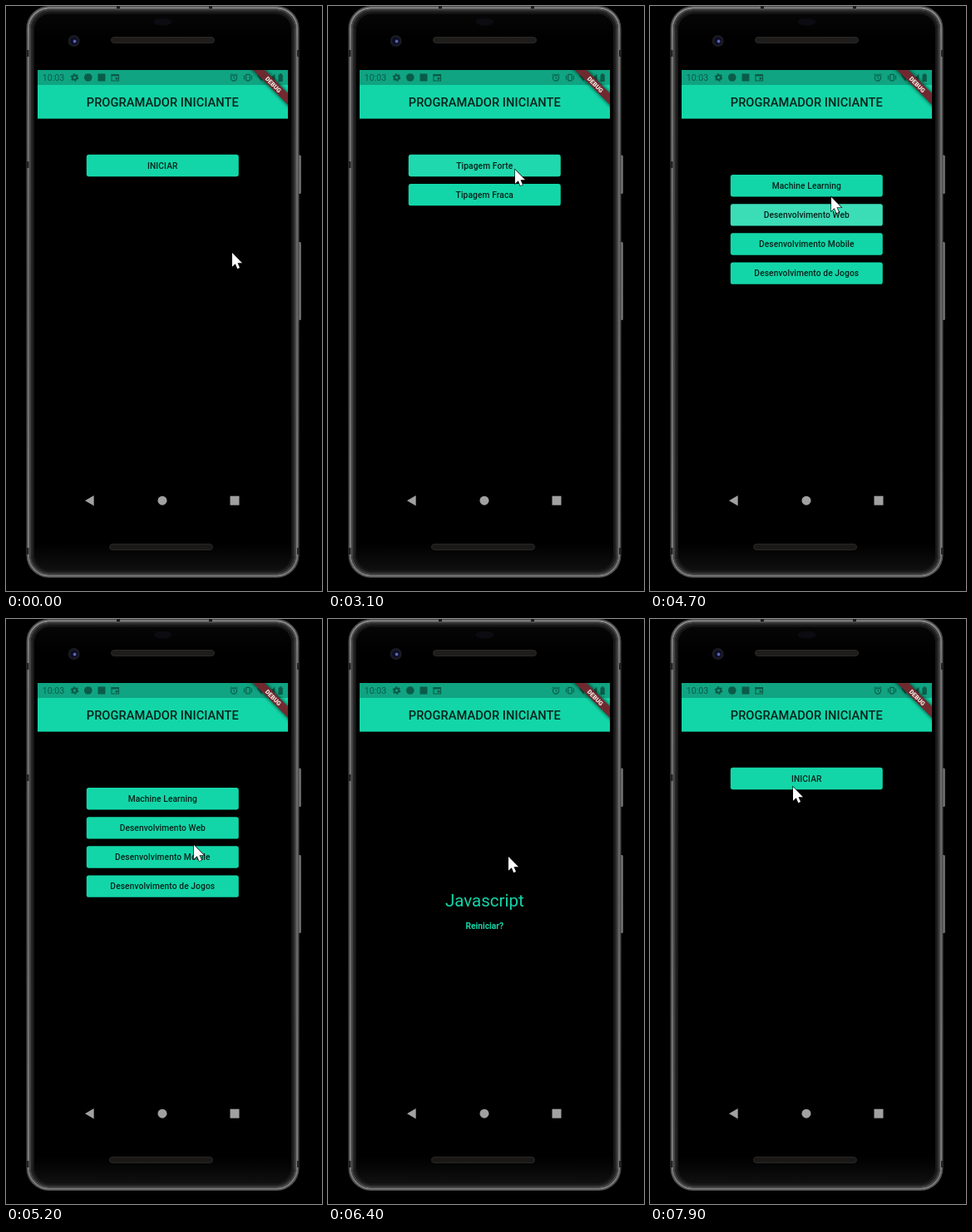
Recreate the animation shown at these times as an HTML page. Size 380 by 704 pixels, loop 8 s.

```html
<!DOCTYPE html>
<html lang="pt">
<head>
<meta charset="utf-8">
<title>Programador Iniciante</title>
<style>
  html, body { margin: 0; width: 100%; height: 100%; overflow: hidden; background: #000; }
  svg { display: block; width: 380px; height: 704px; }
  text { font-family: Roboto, sans-serif; }
  .label { font-size: 10.25px; font-weight: 500; letter-spacing: .08px; text-anchor: middle; }
  .link { font-weight: 700; letter-spacing: 0; }
</style>
</head>
<body>
<svg viewBox="0 0 380 704" xmlns="http://www.w3.org/2000/svg">
  <defs>
    <linearGradient id="rim" x1="0" y1="0" x2="0" y2="1">
      <stop offset="0" stop-color="#8c8c8c"/>
      <stop offset=".06" stop-color="#747474"/>
      <stop offset=".5" stop-color="#666"/>
      <stop offset="1" stop-color="#7c7c7c"/>
    </linearGradient>
    <linearGradient id="face" x1="0" y1="0" x2="0" y2="1">
      <stop offset="0" stop-color="#060606"/>
      <stop offset=".05" stop-color="#000"/>
      <stop offset=".95" stop-color="#000"/>
      <stop offset="1" stop-color="#101010"/>
    </linearGradient>
    <linearGradient id="key" x1="0" y1="0" x2="1" y2="0">
      <stop offset="0" stop-color="#4a4a4a"/>
      <stop offset=".6" stop-color="#7c7c7c"/>
      <stop offset="1" stop-color="#555"/>
    </linearGradient>
    <clipPath id="screen"><rect x="38" y="77" width="301" height="544"/></clipPath>
    <clipPath id="slot"><rect id="slotBox" rx="2.9"/></clipPath>
    <filter id="soft" x="-30%" y="-100%" width="160%" height="300%"><feGaussianBlur stdDeviation="2"/></filter>
  </defs>

  <!-- phone body -->
  <g>
    <rect x="349.500" y="179.500" width="5.500" height="46.500" rx="1.500" fill="url(#key)"/>
    <rect x="350" y="284" width="5" height="94" rx="1.500" fill="url(#key)"/>
    <g fill="none" stroke-width="2">
      <rect x="25.500" y="1" width="326" height="686" rx="26" fill="#0c0c0c" stroke="#4c4c4c"/>
      <rect x="27" y="2.500" width="323" height="683" rx="25" stroke="url(#rim)"/>
      <rect x="29" y="4.500" width="319" height="679" rx="23" stroke="#444"/>
      <rect x="31" y="6.500" width="315" height="675" rx="21.500" stroke="#262626"/>
      <rect x="33" y="8.500" width="311" height="671.500" rx="20" fill="url(#face)" stroke="#171717"/>
    </g>
    <path d="M26 53v8M26 187v8M351.500 53v8M26 652v8M351.500 652v8" stroke="#222" stroke-width="3"/>
    <path d="M135 0v3M246 0v3" stroke="#1c1c1c" stroke-width="4"/>
    <ellipse cx="188.500" cy="19" rx="11" ry="4.500" fill="#0c0b11"/>
    <circle cx="81.700" cy="42" r="7" fill="#1a1b23"/>
    <circle cx="81.700" cy="42" r="4.600" fill="#0d0e24"/>
    <circle cx="82.600" cy="42.500" r="1.900" fill="#5a64b4"/>
    <rect x="126.500" y="37.500" width="124" height="7" rx="3.500" fill="#1f1d1b" stroke="#2a2826"/>
    <rect x="124.500" y="647.500" width="124" height="7" rx="3.500" fill="#1a1917" stroke="#292725"/>
  </g>

  <g clip-path="url(#screen)">
    <rect x="38" y="77" width="301" height="544"/>
    <rect x="38" y="77" width="301" height="58.600" fill="#13d6a8"/>
    <rect x="38" y="77" width="301" height="18" fill="#10a482"/>
    <text x="188.300" y="120.700" text-anchor="middle" font-size="14.640" font-weight="500" letter-spacing=".05" fill="#06231b">PROGRAMADOR INICIANTE</text>

    <!-- status bar -->
    <g fill="#0a5c49" stroke="#0a5c49" stroke-width="0">
      <text x="43.800" y="90" font-size="10.600">10:03</text>
      <circle cx="82.500" cy="86" r="2.700" fill="none" stroke-width="2.200"/>
      <circle cx="82.500" cy="86" r="4.100" fill="none" stroke-width="1.400" stroke-dasharray="2.150 2.150"/>
      <circle cx="98.800" cy="86" r="4.800"/>
      <rect x="110.500" y="81.500" width="9" height="9"/>
      <path d="M127 82.500h8.500v7.500h-8.500z" fill="none" stroke-width="1.100"/>
      <path d="M126.500 82h9.500v2.500h-9.500zM131.500 86h3v2.600h-3z"/>
      <circle cx="274" cy="86.500" r="3.600" fill="none" stroke-width="1.100"/>
      <path d="M274 84.300v2.500l1.700 1M269.300 83.500l2.300-2M278.700 83.500l-2.300-2" fill="none" stroke-width="1"/>
      <rect x="288.700" y="82.300" width="4.600" height="7.600" rx=".8" fill="none" stroke-width="1.200"/>
      <path d="M286.500 83.500v5M295.500 83.500v5" stroke-width="1.100"/>
      <path d="M302 83.500q5-4 10 0l-5 7z"/>
      <path d="M323.500 81.500v9h-9z"/>
      <path d="M327.500 82.500h1.500v-1.200h2.300v1.200h1.500v8.500h-5.300z"/>
    </g>

    <!-- corner banner -->
    <g transform="translate(339 77) rotate(45)">
      <rect x="-44" y="19.500" width="88" height="10.500" fill="#000" opacity=".7" filter="url(#soft)"/>
      <rect x="-44" y="20" width="88" height="9.600" fill="#702a2f"/>
      <text x="0" y="27.500" text-anchor="middle" font-size="7.400" font-weight="900" fill="#f3e8e6">DEBUG</text>
    </g>

    <g id="ui"></g>

    <g fill="#a1a1a1">
      <path d="M95 595.200l10.700-6.200v12.400z"/>
      <circle cx="188" cy="595.200" r="5.500"/>
      <rect x="269.500" y="589.700" width="11" height="11"/>
    </g>
  </g>

  <path id="cursor" d="M0 0V16.800L3.800 13.300 6.300 19.200 9 18 6.500 12.200H12Z" fill="#fff" stroke="#000" stroke-width="1.200" paint-order="stroke"/>
</svg>

<script>
const LOOP = 8000, STEP = 100, MID = 188.3;
const BTN = { w: 183, h: 26.4, gap: 35.15 };
const $ = id => document.getElementById(id);

const start = { top: 178.8, rows: ['INICIAR'] };
const typing = { top: 178.8, rows: ['Tipagem Forte', 'Tipagem Fraca'] };
const area = {
  top: 203,
  rows: ['Machine Learning', 'Desenvolvimento Web', 'Desenvolvimento Mobile', 'Desenvolvimento de Jogos']
};
const result = { top: 355.7, rows: ['Reiniciar?'], title: 'Javascript', w: 58 };

const scenes = [[0, start], [2900, typing], [4600, area], [6200, result], [7400, start]];

const clicks = [
  { row: 0, down: 2770, up: 2810, end: 3300, x: 225, y: 197 },
  { row: 1, down: 4430, up: 4510, end: 4950, x: 218, y: 230 },
  { row: 2, down: 5980, up: 6110, end: 6200, x: 218, y: 292 },
  { row: 0, down: 7280, up: 7380, end: 7400, x: 196, y: 362 }
];

// time, x, y of the pointer tip
const path = [
  [0, 272, 297], [1600, 272, 297], [1800, 263, 272], [2100, 242, 217], [2400, 225, 197],
  [3400, 225, 197], [3900, 221, 223], [4000, 221, 223], [4300, 218, 230], [4700, 218, 230],
  [4900, 221, 256], [5200, 226, 272], [5400, 213, 286], [5600, 218, 292], [6200, 218, 292],
  [6600, 216, 280], [6900, 216, 280], [7200, 196, 362], [7400, 196, 362], [7800, 172, 202], [LOOP, 172, 202]
];

const clamp = v => Math.max(0, Math.min(1, v));
const mix = (a, b, k) => a + (b - a) * k;
const easeOut = k => 1 - (1 - k) ** 3;

function pointer(t) {
  const i = path.findIndex(p => p[0] > t);
  const [a, b] = [path[i - 1], path[i]];
  const k = (t - a[0]) / (b[0] - a[0]);
  return [mix(a[1], b[1], k), mix(a[2], b[2], k)];
}

// Ink spreads slowly while held, quickly after release, then fades.
function ripple(t, scene) {
  const c = clicks.find(c => t >= c.down && t < c.end);
  if (!c) return '';
  const w = scene.w || BTN.w;
  const y = scene.top + c.row * BTN.gap;
  const box = { x: MID - w / 2, y, width: w, height: BTN.h };
  for (const key in box) $('slotBox').setAttribute(key, box[key]);

  const held = clamp((Math.min(t, c.up) - c.down) / 1000);
  const grow = mix(held, 1, easeOut(clamp((t - c.up) / 225)));
  const fade = (1 - clamp((t - c.up - 225) / 150)) ** 2;
  const r = mix(.32, 1.02, grow) * Math.hypot(w, BTN.h) / 2;
  const cx = mix(c.x, MID, grow), cy = mix(Math.min(c.y, y + BTN.h), y + BTN.h / 2, grow);
  const fill = scene.title ? '#13d6a8' : '#fff';
  return `<g clip-path="url(#slot)"><circle cx="${cx}" cy="${cy}" r="${r}" fill="${fill}" opacity="${.17 * fade}"/></g>`;
}

function markup(t) {
  const scene = scenes.filter(s => s[0] <= t).pop()[1];
  const { top, rows, title } = scene;
  const x = MID - BTN.w / 2;
  const boxes = title ? '' : rows.map((_, i) =>
    `<rect x="${x}" y="${top + i * BTN.gap}" width="${BTN.w}" height="${BTN.h}" rx="2.9" fill="#13d6a8"/>`).join('');
  const style = title ? 'class="label link" fill="#13d6a8"' : 'class="label" fill="#06231b"';
  const labels = rows.map((s, i) =>
    `<text ${style} x="${MID}" y="${top + i * BTN.gap + 16.8}">${s}</text>`).join('');
  const head = title
    ? `<text x="${MID}" y="346" text-anchor="middle" font-size="20.5" fill="#13d6a8">${title}</text>` : '';
  return boxes + ripple(t, scene) + labels + head;
}

let shown = -1;
function draw(now) {
  const t = Math.floor((now % LOOP) / STEP) * STEP;
  if (t !== shown) {
    shown = t;
    $('ui').innerHTML = markup(t);
    $('cursor').setAttribute('transform', `translate(${pointer(t)})`);
  }
}

const t0 = performance.now();
function tick() {
  draw(performance.now() - t0);
  requestAnimationFrame(tick);
}
tick();
</script>
</body>
</html>
```
